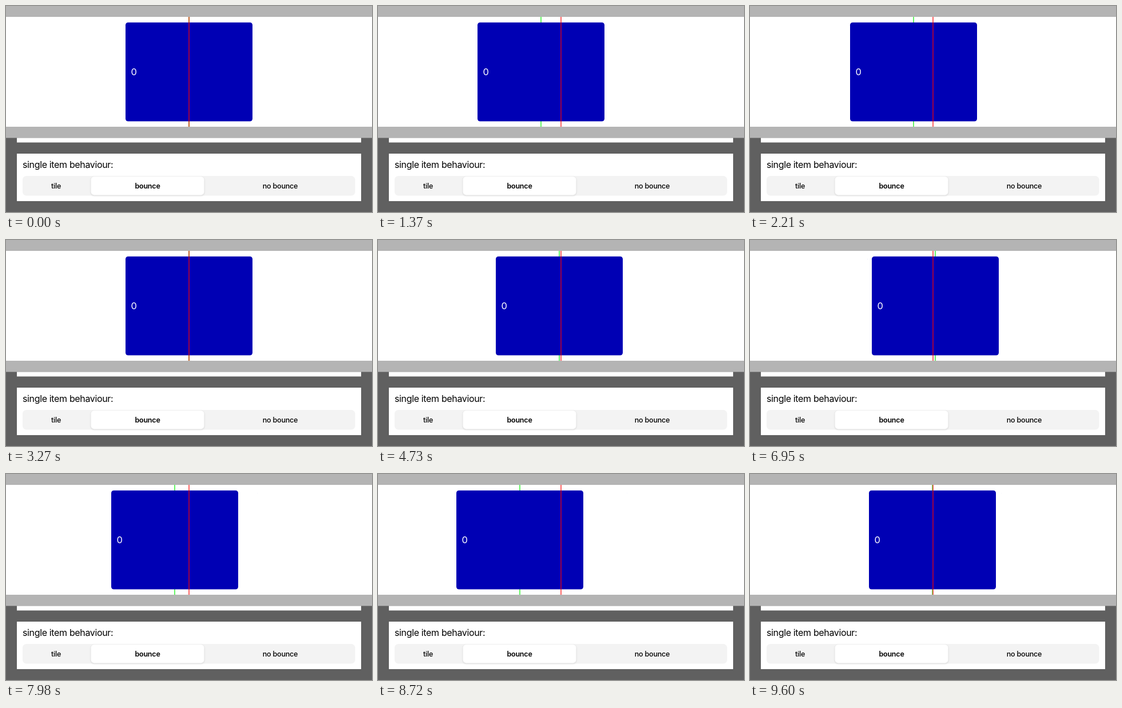
Animation, 640 px wide and 360 px high, one loop 9.69 s. Source, as an HTML page:

```html
<!DOCTYPE html>
<html lang="en">
<head>
<meta charset="utf-8">
<title>Single item behaviour</title>
<style>
  html, body { margin: 0; width: 100%; height: 100%; overflow: hidden; background: #606060; }
  svg { display: block; width: 640px; height: 360px; font-family: Inter, Roboto, sans-serif; }
  .thumb { filter: drop-shadow(0 1px 1.5px rgb(0 0 0 / .14)); }
  .label { font-size: 16px; letter-spacing: -.35px; }
  .option { font-size: 12.5px; font-weight: 500; letter-spacing: -.2px; text-anchor: middle; }
  .selected { font-weight: 600; }
</style>
</head>
<body>
<svg viewBox="0 0 640 360">
  <rect width="640" height="230.5" fill="#b4b4b4"/>
  <rect y="19" width="640" height="192" fill="#fff"/>

  <g id="item">
    <rect x="319.4" y="19" width="1.2" height="192" fill="#00f000"/>
    <rect x="209" y="28.8" width="222" height="172.7" rx="4.5" fill="#0000b4"/>
    <text x="218.5" y="121.3" font-size="16.5" fill="#fff">0</text>
  </g>
  <rect x="319.4" y="19" width="1.2" height="192" fill="#f00"/>

  <rect x="19" y="230.5" width="602" height="8" fill="#fff"/>
  <rect x="19" y="258" width="602" height="83" fill="#fff"/>
  <text class="label" x="29" y="283">single item behaviour:</text>
  <rect x="29" y="297" width="581.5" height="34.5" rx="6.5" fill="#f3f3f3"/>
  <rect class="thumb" x="148.5" y="298" width="198" height="32.5" rx="6" fill="#fff"/>
  <text class="option" x="87.5" y="318.5">tile</text>
  <text class="option selected" x="247.5" y="318.5">bounce</text>
  <text class="option" x="479.5" y="318.5">no bounce</text>
</svg>
<script>
  const LOOP = 9690;
  const STIFFNESS = 0.012;

  // Bursts of evenly spaced updates: first time, last time, count.
  const bursts = [
    [960, 1060, 2], [1370, 1910, 6], [2100, 2440, 4], [2740, 3700, 10],
    [4050, 4550, 6], [4730, 5060, 4], [5320, 6170, 9], [6620, 7490, 9],
    [7590, 7590, 1], [7880, 8840, 10], [9070, 9600, 6]
  ];

  // A drag away from rest that slows down towards its end.
  const pull = (start, end, to) => ({
    start,
    at: t => to * Math.sin(Math.PI / 2 * Math.min(1, (t - start) / (end - start)))
  });

  // A critically damped spring back to rest.
  const release = (start, from) => ({
    start,
    at: t => {
      const k = STIFFNESS * (t - start);
      return from * (1 + k) * Math.exp(-k);
    }
  });

  const moves = [
    pull(910, 1060, -24), release(1370, -35),
    pull(2060, 2440, -59), release(2740, -61),
    pull(3270, 3700, 62), release(3970, 62),
    pull(4720, 5060, -64), release(5320, -66),
    pull(5934, 6170, 76), release(6560, 76),
    pull(7200, 7590, -66), release(7805, -66),
    pull(8440, 8840, -111), release(9040, -111)
  ];

  function lastUpdate(t) {
    const burst = bursts.findLast(([first]) => first <= t);
    if (!burst) return 0;
    const [first, last, count] = burst;
    if (t >= last) return last;
    const gap = (last - first) / (count - 1);
    const tick = i => Math.floor((first + i * gap) / 10) * 10;
    let i = 0;
    while (tick(i + 1) <= t) i++;
    return tick(i);
  }

  function offset(t) {
    const time = lastUpdate(t);
    const move = moves.findLast(m => m.start <= time);
    return move ? Math.round(move.at(time)) : 0;
  }

  const item = document.getElementById('item');
  let began;
  function draw(now) {
    began ??= now;
    item.setAttribute('transform', `translate(${offset((now - began) % LOOP)} 0)`);
    requestAnimationFrame(draw);
  }
  requestAnimationFrame(draw);
</script>
</body>
</html>
```
